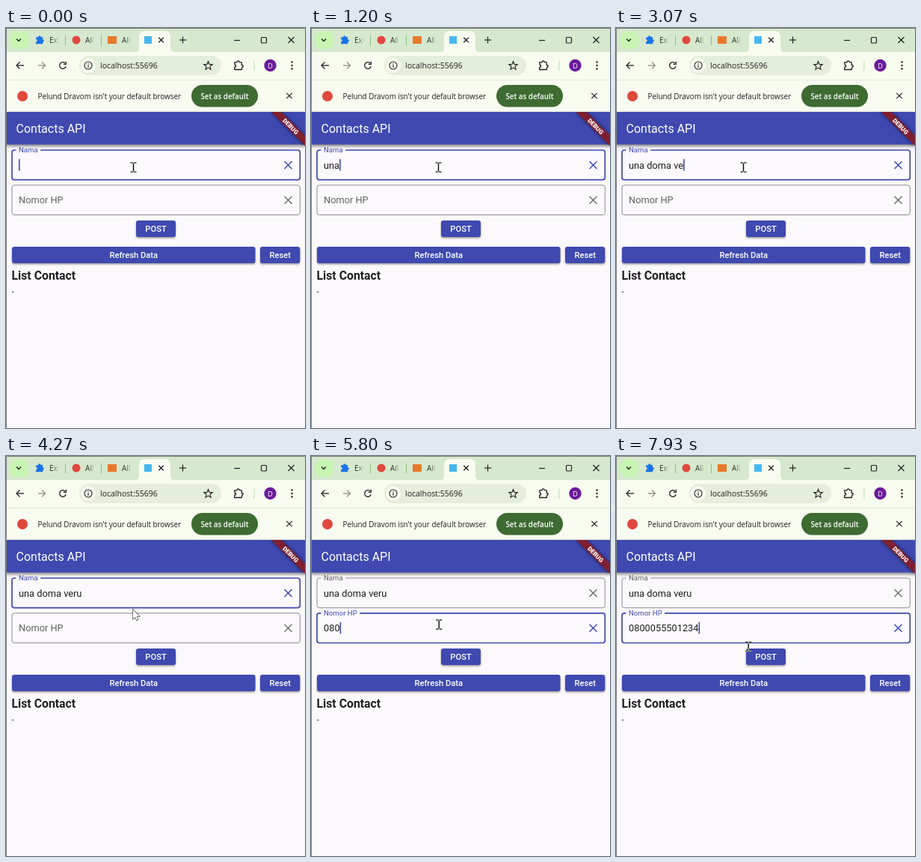
An HTML page with a canvas that plays this animation: 400x534 px, repeating every 8 s.

```html
<!DOCTYPE html>
<html lang="id">
<head>
<meta charset="utf-8">
<title>Contacts API</title>
<style>
html, body { margin: 0; width: 100%; height: 100%; overflow: hidden; background: #fcf9fc; }
canvas { display: block; width: 100vw; height: 100vh; }
</style>
</head>
<body>
<canvas id="stage"></canvas>
<script>
const W = 400, H = 534, LOOP = 8000, FPS = 15;
const BLUE = [63, 73, 176], GRAY = [130, 129, 136], INK = '#1f2020';
const UI = '"Open Sans", "Noto Sans", sans-serif';
const APP = 'Roboto, "Noto Sans", sans-serif';
const NAME = 'una doma veru', PHONE = '0800055501234';
const NAME_KEYS = [600, 800, 1000, 1530, 1730, 1930, 2130, 2330, 2600, 2800, 3000, 3270, 3470];
const PHONE_KEYS = Array.from(PHONE, (_, i) => i < 3 ? 5330 + i * 200 : 5845 + (i - 3) * 60);
const FOCUS_AT = 4800, BLINK = 540;

const canvas = document.getElementById('stage');
const ctx = canvas.getContext('2d');
const dpr = window.devicePixelRatio || 1;
canvas.width = W * dpr;
canvas.height = H * dpr;

const clamp = v => Math.max(0, Math.min(1, v));
const lerp = (a, b, p) => a + (b - a) * p;
const smooth = p => p * p * (3 - 2 * p);
const span = (t, from, to) => smooth(clamp((t - from) / (to - from)));
const mix = (a, b, p) => `rgb(${a.map((v, i) => Math.round(lerp(v, b[i], p)))})`;
const css = c => `rgb(${c})`;

function box(x, y, w, h, color, r = 0) {
  ctx.fillStyle = color;
  ctx.beginPath();
  ctx.roundRect(x, y, w, h, r);
  ctx.fill();
}

function disc(x, y, r, color) {
  ctx.fillStyle = color;
  ctx.beginPath();
  ctx.arc(x, y, r, 0, 7);
  ctx.fill();
}

function line(points, color, width = 1.2, close = false) {
  ctx.strokeStyle = color;
  ctx.lineWidth = width;
  ctx.beginPath();
  points.forEach(([x, y]) => ctx.lineTo(x, y));
  if (close) ctx.closePath();
  ctx.stroke();
}

function cross(x, y, r, color, width) {
  line([[x - r, y - r], [x + r, y + r]], color, width);
  line([[x - r, y + r], [x + r, y - r]], color, width);
}

function text(s, x, y, font, color, align = 'left') {
  ctx.font = font;
  ctx.fillStyle = color;
  ctx.textAlign = align;
  ctx.fillText(s, x, y);
}

function shadowed(blur, dy, alpha, draw) {
  ctx.save();
  ctx.shadowColor = `rgba(0,0,0,${alpha})`;
  ctx.shadowBlur = blur * dpr;
  ctx.shadowOffsetY = dy * dpr;
  draw();
  ctx.restore();
}

function puzzlePath(x, y, s) {
  const k = s * 0.24;
  ctx.beginPath();
  ctx.moveTo(x - s, y - s * 0.7);
  ctx.lineTo(x - s * 0.45, y - s * 0.7);
  ctx.arc(x - s * 0.15, y - s * 0.8, k, Math.PI, 0);
  ctx.lineTo(x + s * 0.65, y - s * 0.7);
  ctx.lineTo(x + s * 0.65, y - s * 0.1);
  ctx.arc(x + s * 0.75, y + s * 0.15, k, -Math.PI / 2, Math.PI / 2);
  ctx.lineTo(x + s * 0.65, y + s * 0.95);
  ctx.lineTo(x - s, y + s * 0.95);
  ctx.lineTo(x - s, y + s * 0.45);
  ctx.arc(x - s * 0.9, y + s * 0.15, k, Math.PI / 2, -Math.PI / 2, true);
  ctx.closePath();
}

function fadedTitle(s, x) {
  const g = ctx.createLinearGradient(x, 0, x + 13, 0);
  g.addColorStop(0.3, 'rgba(40,50,38,1)');
  g.addColorStop(1, 'rgba(40,50,38,0)');
  text(s, x, 20, `10px ${UI}`, g);
}

function drawTabs() {
  box(0, 0, W, 33, '#d6e8cd');
  box(6, 5, 24, 23, '#c9f5b2', 8);
  line([[14, 14.5], [17, 17.5], [20, 14.5]], INK, 1.4);
  puzzlePath(45.5, 16, 5.5);
  ctx.fillStyle = '#1a73e8';
  ctx.fill();
  fadedTitle('Exte', 58);
  line([[79.5, 10], [79.5, 23]], '#8cc07f', 1);
  disc(94, 16, 5.5, '#e0483e');
  fadedTitle('All', 106);
  line([[127.5, 10], [127.5, 23]], '#8cc07f', 1);
  box(136, 11, 12, 10, '#e8792b');
  fadedTitle('All', 155);

  ctx.fillStyle = '#f8fbf0';
  ctx.beginPath();
  ctx.moveTo(171, 33);
  ctx.quadraticCurveTo(178, 33, 178, 26);
  ctx.lineTo(178, 12);
  ctx.quadraticCurveTo(178, 4, 186, 4);
  ctx.lineTo(212, 4);
  ctx.quadraticCurveTo(220, 4, 220, 12);
  ctx.lineTo(220, 26);
  ctx.quadraticCurveTo(220, 33, 227, 33);
  ctx.fill();
  box(185, 11, 10, 10, '#46b8f0');
  cross(207.5, 16, 3.2, INK, 1.3);
  line([[232, 16], [241, 16]], INK);
  line([[236.5, 11.5], [236.5, 20.5]], INK);
  line([[305, 16.5], [313, 16.5]], INK);
  ctx.lineWidth = 1.2;
  ctx.beginPath();
  ctx.roundRect(341.5, 12.5, 7, 7.5, 1);
  ctx.stroke();
  cross(381.5, 16, 4, INK, 1.2);
}

function drawToolbar() {
  box(0, 32, W, 80, '#f8fbf0');
  line([[24, 50], [14.5, 50]], INK, 1.3);
  line([[18.5, 45.5], [14, 50], [18.5, 54.5]], INK, 1.3);
  line([[43, 50], [52, 50]], '#8a9187', 1.3);
  line([[48, 45.5], [52.5, 50], [48, 54.5]], '#8a9187', 1.3);
  ctx.strokeStyle = INK;
  ctx.lineWidth = 1.3;
  ctx.beginPath();
  ctx.arc(76, 50, 4.3, 0.3, 5.5);
  ctx.stroke();
  line([[80.3, 44.8], [80.3, 48.3], [76.8, 48.3]], INK, 1.3);

  box(98, 37, 190, 26, '#e5eedd', 13);
  disc(110, 50, 10, '#f8fbf0');
  ctx.strokeStyle = INK;
  ctx.lineWidth = 1.1;
  ctx.beginPath();
  ctx.arc(110, 50, 5, 0, 7);
  ctx.stroke();
  line([[110, 49.4], [110, 52.8]], INK, 1.2);
  line([[110, 47.2], [110, 48.4]], INK, 1.2);
  text('localhost:55696', 126, 54, `10.5px ${UI}`, INK);
  const star = Array.from({ length: 10 }, (_, i) => {
    const r = i % 2 ? 2.6 : 6, a = i * Math.PI / 5 - Math.PI / 2;
    return [270.5 + r * Math.cos(a), 50.5 + r * Math.sin(a)];
  });
  line(star, INK, 1.1, true);
  puzzlePath(311.5, 50, 5.8);
  ctx.lineWidth = 1.3;
  ctx.stroke();
  line([[332, 44], [332, 57]], '#c5e3b8', 1.2);
  disc(353.5, 50, 8.2, '#6a1b9a');
  text('D', 353.5, 53.5, `9.5px ${UI}`, '#fff', 'center');
  [45.5, 50, 54.5].forEach(y => disc(382.5, y, 1.2, INK));

  line([[0, 69.5], [W, 69.5]], '#e1e9d8', 1);
  disc(22, 91, 7, '#e0483e');
  text("Pelund Dravom isn't your default browser", 42.5, 94.5, `9.9px ${UI}`, INK);
  box(248, 76, 89, 29.5, '#3e6b32', 14.75);
  text('Set as default', 292.5, 94.5, `600 9.8px ${UI}`, '#fff', 'center');
  cross(379, 90.5, 3.7, INK, 1.2);
}

function drawAppBar() {
  shadowed(4, 2, 0.45, () => box(0, 112, W, 43.5, css(BLUE)));
  text('Contacts API', 13.5, 139.5, `16px ${APP}`, '#fff');
  ctx.save();
  ctx.beginPath();
  ctx.rect(0, 112, W, 80);
  ctx.clip();
  ctx.translate(W, 112);
  ctx.rotate(Math.PI / 4);
  shadowed(5, 0, 0.6, () => box(-32, 22.4, 64, 9.6, '#7f1f32'));
  text('DEBUG', 0, 30.2, `900 8.16px ${APP}`, '#fff', 'center');
  ctx.restore();
}

// focus and lift run from 0 to 1: border emphasis and label height
function drawField(y, label, value, focus, lift, caret) {
  const color = mix(GRAY, BLUE, focus);
  const size = lerp(12.8, 9.6, lift);
  const font = `${size}px ${APP}`;
  ctx.font = `9.6px ${APP}`;
  const gap = (ctx.measureText(label).width + 7) * lift;
  ctx.save();
  ctx.beginPath();
  ctx.rect(0, y - 3, W, 50);
  if (gap > 0) ctx.rect(13.5 + (1 - lift) * 8, y - 3, gap, 6);
  ctx.clip('evenodd');
  ctx.strokeStyle = color;
  ctx.lineWidth = lerp(0.9, 1.7, focus);
  ctx.beginPath();
  ctx.roundRect(8, y, 385.3, 39.7, 3.2);
  ctx.stroke();
  ctx.restore();

  text(label, 17, lerp(y + 24.3, y + 3.2, lift), font, mix([98, 97, 103], BLUE, focus));
  text(value, 17, y + 24.5, `12.8px ${APP}`, INK);
  if (caret) box(17 + ctx.measureText(value).width, y + 12, 1.6, 15.5, css(BLUE));
  cross(377.5, y + 20, 5, mix([112, 111, 117], BLUE, focus), 1.5);
}

function drawButton(x, y, w, label) {
  shadowed(2.5, 1.4, 0.4, () => box(x, y, w, 22, css(BLUE), 3));
  text(label, x + w / 2, y + 15.2, `500 11.2px ${APP}`, '#fff', 'center');
}

function drawPointer(t) {
  const down = span(t, 3900, 4640), post = span(t, 7400, 7930);
  const x = 170.5 + 0.7 * down + 6 * post;
  const y = 186 + 39 * down + 29.5 * post;
  if (y > 203 && y < 210) {
    const tip = [[0, 0], [0, 12.2], [2.8, 9.7], [4.7, 13.8], [6.6, 13], [4.8, 9], [8.6, 8.8]];
    const shape = tip.map(([dx, dy]) => [x - 0.8 + dx, y + dy]);
    line(shape, '#333', 1.3, true);
    ctx.fillStyle = '#fff';
    ctx.fill();
    return;
  }
  // inverted I-beam
  ctx.save();
  ctx.globalCompositeOperation = 'difference';
  box(x - 0.7, y - 5.5, 1.4, 11, '#fff');
  for (const edge of [y - 6.7, y + 5.5]) {
    box(x - 4, edge, 3.4, 1.2, '#fff');
    box(x + 0.6, edge, 3.4, 1.2, '#fff');
  }
  ctx.restore();
}

function draw(t) {
  ctx.setTransform(dpr, 0, 0, dpr, 0, 0);
  box(0, 0, W, H, '#fcf9fc');
  drawTabs();
  drawToolbar();
  drawAppBar();

  const typed = keys => keys.filter(k => k <= t).length;
  const inPhone = t >= FOCUS_AT;
  const keys = [...NAME_KEYS, FOCUS_AT, ...PHONE_KEYS].filter(k => k <= t);
  const caret = Math.floor((t - (keys.pop() || 0)) / BLINK) % 2 === 0;
  const focus = span(t, FOCUS_AT, FOCUS_AT + 180);
  drawField(163, 'Nama', NAME.slice(0, typed(NAME_KEYS)), 1 - focus, 1, caret && !inPhone);
  drawField(209.8, 'Nomor HP', PHONE.slice(0, typed(PHONE_KEYS)), focus, focus, caret && inPhone);

  drawButton(174, 257, 53, 'POST');
  drawButton(8, 292, 325.5, 'Refresh Data');
  drawButton(340, 292, 53.3, 'Reset');
  text('List Contact', 7.5, 336, `600 15.8px ${APP}`, INK);
  text('-', 7.5, 355.5, `11.2px ${APP}`, INK);
  box(0, 0, W, 1, '#7d827b');
  box(0, 0, 1, H, '#7d7d80');
  drawPointer(t);
}

const start = performance.now();
function tick() {
  const t = (performance.now() - start) % LOOP;
  draw(Math.floor((t + 4) * FPS / 1000) * 1000 / FPS);
  requestAnimationFrame(tick);
}
tick();
</script>
</body>
</html>
```
